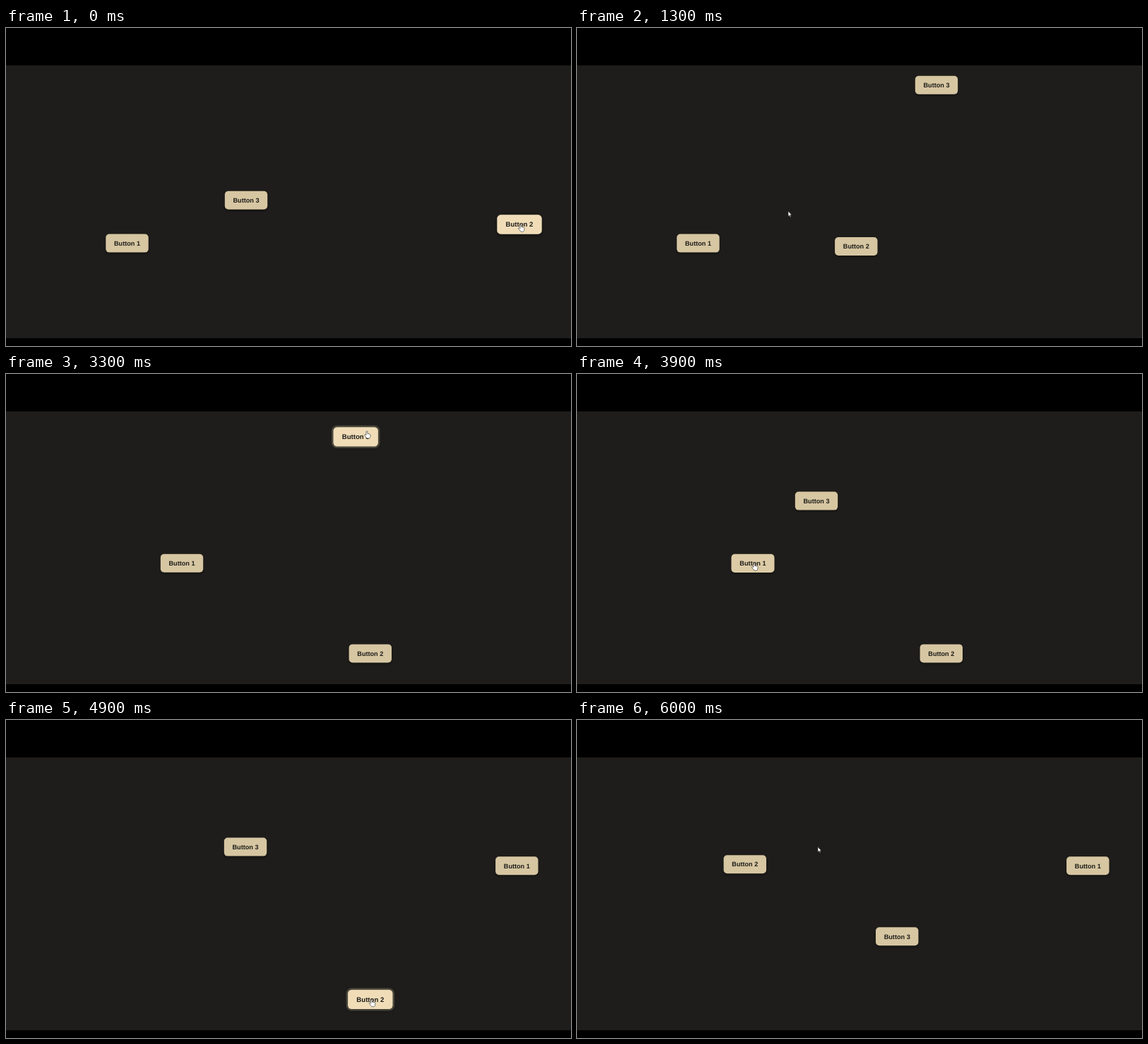
Recreate the animation shown at these times as an HTML page. Size 800 by 450 pixels, loop 6500 ms.

```html
<!DOCTYPE html>
<html lang="en">
<head>
<meta charset="utf-8">
<title>Moving buttons</title>
<style>
  html, body { margin: 0; width: 100%; height: 100%; overflow: hidden; background: #000; }
  svg { display: block; width: 100%; height: 100%; }
  text {
    font: bold 9.14px "Liberation Sans", Arial, sans-serif;
    fill: #1d1c19; text-anchor: middle; text-rendering: geometricPrecision;
  }
</style>
</head>
<body>
<svg viewBox="0 0 800 450">
  <defs>
    <filter id="soft" x="-30%" y="-50%" width="160%" height="200%">
      <feGaussianBlur stdDeviation="1.8"/>
    </filter>
  </defs>
  <rect width="800" height="450" fill="#000"/>
  <rect y="53" width="800" height="386" fill="#1e1d1b"/>
  <g id="buttons"></g>
  <g id="cursor" fill="#fff" stroke="#222" stroke-width=".6" stroke-linejoin="round">
    <path id="arrow" d="M0 0V7.2L1.7 5.7 2.8 8.2 4 7.7 2.9 5.3H5Z"/>
    <path id="hand" d="M-1 .8C-1-.3 .9-.3 .9.8V3.6l3 .6c.9.2 1.3.8 1.2 1.6l-.5 2.7c-.2 1.2-.9 1.8-2 1.8H1c-.8 0-1.3-.3-1.8-1l-2.6-3.4c-.5-.8.5-1.6 1.2-1L-1 5.7z"/>
  </g>
</svg>
<script>
const LOOP = 6500, LAST = 6000, STEP = 100;
const W = 60.4, H = 26, GROW = .05;
const MOVE = 330, FADE = 300, PRESS = 150, PACE = 1.1;
const REST = [214, 198, 161], LIT = [240, 221, 184];

const starts = [{ x: 171.5, y: 304.6 }, { x: 727, y: 278 }, { x: 340, y: 243.8 }];

// The buttons are clicked in turn; each click sends its button to a new place.
const clicks = [
  { over: -400, at: 150, x: 395.3, y: 309 },
  { over: 560, at: 850, x: 509, y: 80.8 },
  { over: 1422, at: 2018, x: 249, y: 267.8 },
  { over: 2310, at: 2595, x: 515.8, y: 395.4 },
  { over: 3000, at: 3270, x: 339, y: 179.6 },
  { over: 3850, at: 4175, x: 723.3, y: 206.3 },
  { over: 4600, at: 4950, x: 237.8, y: 204.2 },
  { over: 5330, at: 5630, x: 453.2, y: 306.3 }
];

const places = starts.map(p => ({ ...p }));
clicks.forEach((c, i) => {
  c.button = (i + 1) % 3;
  const { x, y } = places[c.button];
  c.aim = { x: x + 2, y };
  places[c.button] = c;
});

const $ = id => document.getElementById(id);
const clamp = v => Math.max(0, Math.min(1, v));
const mix = (a, b, p) => a + (b - a) * p;
const mixPoint = (a, b, p) => ({ x: mix(a.x, b.x, p), y: mix(a.y, b.y, p) });
const smooth = v => v * v * (3 - 2 * v);
const bezier = (a, b, s) => 3 * a * s * (1 - s) ** 2 + 3 * b * s * s * (1 - s) + s ** 3;

// CSS "ease" curve
function ease(v) {
  v = clamp(v);
  if (v === 0 || v === 1) return v;
  let lo = 0, hi = 1;
  for (let i = 0; i < 20; i++) {
    const mid = (lo + hi) / 2;
    if (bezier(.25, .25, mid) < v) lo = mid; else hi = mid;
  }
  return bezier(.1, 1, lo);
}

const pulse = (t, on, off, span) => ease((t - on) / span) - ease((t - off) / span);

function add(parent, tag, attrs) {
  const el = document.createElementNS("http://www.w3.org/2000/svg", tag);
  for (const key in attrs) el.setAttribute(key, attrs[key]);
  return parent.appendChild(el);
}

function box(parent, pad, dy, attrs) {
  return add(parent, "rect", {
    x: -W / 2 - pad, y: -H / 2 - pad + dy,
    width: W + 2 * pad, height: H + 2 * pad, rx: 5 + pad, ...attrs
  });
}

const buttons = starts.map((_, i) => {
  const g = add($("buttons"), "g", {});
  box(g, 0, 2, { fill: "#000", opacity: .35, filter: "url(#soft)" });
  const ring = box(g, 2.4, 0, { fill: "#48453a" });
  const face = box(g, 0, 0, {});
  add(g, "text", { y: 3.2 }).textContent = "Button " + (i + 1);
  return { g, ring, face };
});

function pose(index, t) {
  let spot = starts[index], hover = 0, ring = 0;
  for (const c of clicks.filter(c => c.button === index)) {
    spot = mixPoint(spot, c, ease((t - c.at) / MOVE));
    hover += pulse(t, c.over, c.at + 100, FADE);
    ring += pulse(t, c.at - PRESS, c.at + 60, 100);
  }
  return { ...spot, hover: clamp(hover), ring: clamp(ring) };
}

// The pointer travels to each button at a steady pace, arriving as it lights up.
function pointer(t) {
  let spot = clicks[0].aim, last = spot;
  for (const { over, aim } of clicks.slice(1)) {
    const time = PACE * Math.hypot(aim.x - last.x, aim.y - last.y);
    spot = mixPoint(spot, aim, smooth(clamp((t - over - 10) / time + 1)));
    last = aim;
  }
  return spot;
}

function draw(t) {
  const tip = pointer(t);
  let over = false;
  buttons.forEach((b, i) => {
    const s = pose(i, t), scale = 1 + GROW * s.hover;
    b.g.setAttribute("transform", `translate(${s.x} ${s.y}) scale(${scale})`);
    b.ring.setAttribute("opacity", s.ring);
    b.face.setAttribute("fill", `rgb(${REST.map((v, k) => Math.round(mix(v, LIT[k], s.hover)))})`);
    if (Math.abs(tip.x - s.x) < W * scale / 2 && Math.abs(tip.y - s.y) < H * scale / 2) over = true;
  });
  $("cursor").setAttribute("transform", `translate(${tip.x} ${tip.y})`);
  $("hand").setAttribute("visibility", over ? "visible" : "hidden");
  $("arrow").setAttribute("visibility", over ? "hidden" : "visible");
}

const begin = performance.now();
function tick() {
  const t = (performance.now() - begin) % LOOP;
  draw(Math.min(LAST, Math.floor(t / STEP) * STEP));
  requestAnimationFrame(tick);
}
tick();
</script>
</body>
</html>
```
